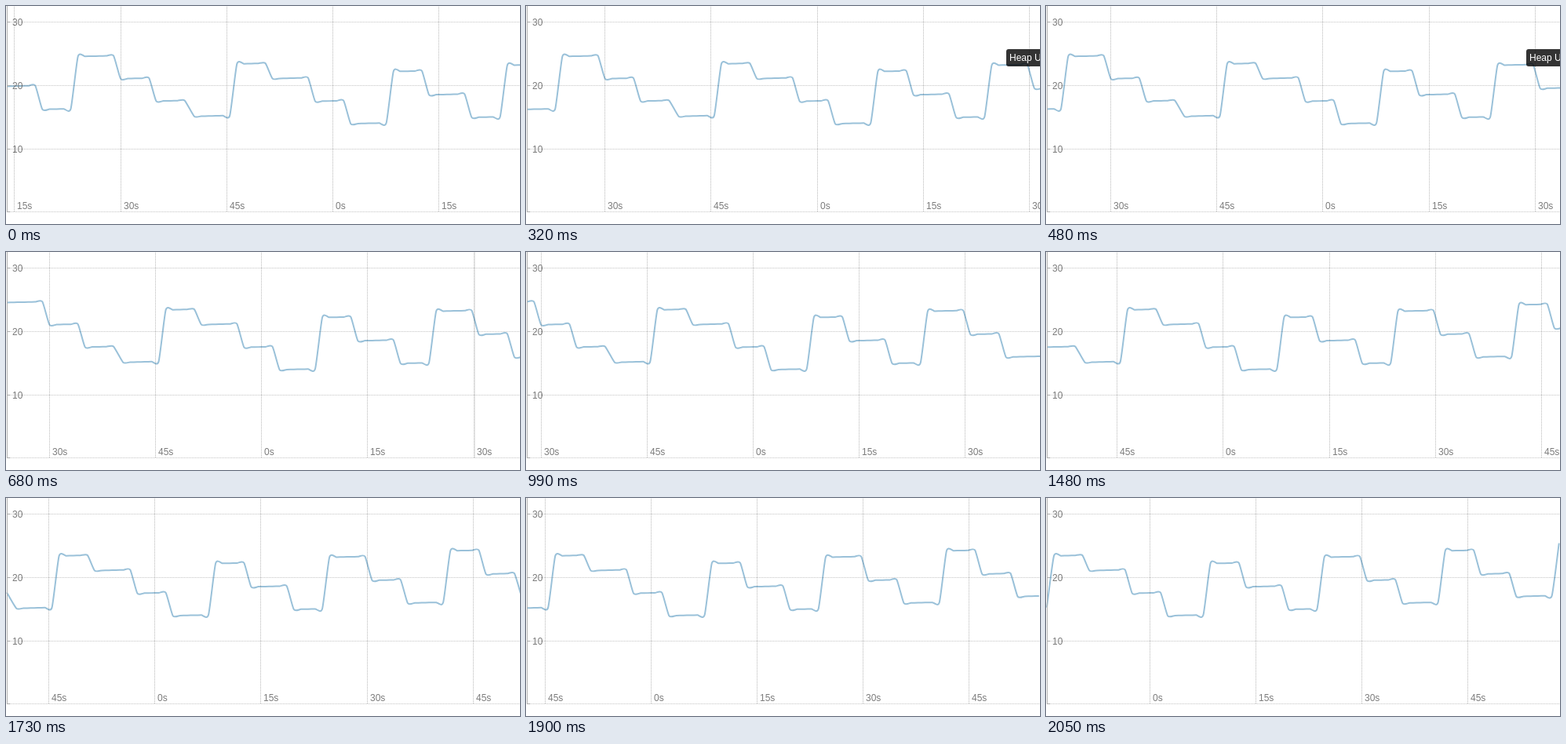
An HTML page with a canvas for the animation above (2.07 s loop, 655 px wide and 278 px high).

```html
<!DOCTYPE html>
<html lang="en">
<head>
<meta charset="utf-8">
<title>Scrolling heap chart</title>
<style>
html, body { margin: 0; width: 100%; height: 100%; overflow: hidden; background: #fff; }
canvas { display: block; }
</style>
</head>
<body>
<canvas id="chart" width="655" height="278"></canvas>
<script>
const ctx = document.getElementById('chart').getContext('2d');
const W = 655, H = 263, LOOP = 2070;
const SECOND = 9.012; // pixels per second of data
const WINDOW = 73;    // samples on screen
const GRAY = '#7c7c7c';

// Heap size at the start of each plateau
const levels = [
  19.85, 16.21, 24.55, 21.04, 17.51, 15.11, 23.38, 21.06, 17.48, 13.94,
  22.18, 18.5, 14.94, 23.16, 19.52, 15.94, 24.18, 20.52, 16.98, 25.4
];

const yOf = value => 262.8 - 8.08 * value;

// A plateau lasts about 5.46 samples and creeps upward; sample 26 came late
const plateauStart = n => Math.max(0, Math.floor(5.46 * n - 0.33));
const samples = Array.from({ length: 104 }, (_, i) => {
  const n = Math.ceil((i + 1.33) / 5.46) - 1;
  return {
    x: (1.006 * i - 46.09 + (i > 25 ? 0.35 : 0)) * SECOND,
    y: yOf(levels[n] + 0.027 * (i - plateauStart(n)))
  };
});

// One sample leaves on the left every 70 ms, a little faster near the end
function firstSample(t) {
  return Math.floor(0.5 + Math.min(t, 1280) / 70 + Math.max(0, t - 1280) / 63);
}

function line(x0, y0, x1, y1) {
  ctx.beginPath();
  ctx.moveTo(x0, y0);
  ctx.lineTo(x1, y1);
  ctx.stroke();
}

function text(label, x, y, color = GRAY) {
  ctx.fillStyle = color;
  ctx.fillText(label, x, y);
}

// Cardinal spline with tension 0.8 through the visible samples
function drawCurve(points, origin) {
  const handle = i => {
    const a = points[Math.max(0, i - 1)];
    const b = points[Math.min(points.length - 1, i + 1)];
    return [(b.x - a.x) * 0.1, (b.y - a.y) * 0.1];
  };
  ctx.save();
  ctx.translate(origin, 0);
  ctx.beginPath();
  ctx.moveTo(points[0].x, points[0].y);
  for (let i = 1; i < points.length; i++) {
    const p = points[i - 1], q = points[i];
    const [px, py] = handle(i - 1), [qx, qy] = handle(i);
    ctx.bezierCurveTo(p.x + px, p.y + py, q.x - qx, q.y - qy, q.x, q.y);
  }
  ctx.strokeStyle = '#9ac1d9';
  ctx.lineWidth = 2;
  ctx.stroke();
  ctx.restore();
}

function drawTimeGrid(origin) {
  ctx.strokeStyle = 'rgba(0,0,0,.28)';
  for (let n = -4; n <= 4; n++) {
    const x = Math.floor(origin + n * 15 * SECOND);
    if (x < 1) continue;
    line(x + 0.5, 1, x + 0.5, H);
    text((n * 15 + 60) % 60 + 's', x + 4, 259);
  }
}

function drawValueGrid() {
  ctx.strokeStyle = 'rgba(0,0,0,.23)';
  for (let value = 0; value <= 30; value += 10) {
    const y = Math.floor(yOf(value));
    line(1, y + 0.5, W, y + 0.5);
    ctx.fillStyle = '#b0b0b0';
    ctx.fillRect(1, y, 4, 1);
    if (value) text(value, 8, y + 5);
  }
  ctx.fillStyle = '#b0b0b0';
  ctx.fillRect(1, 0, 1, H);
}

function drawHover(t) {
  if (t >= 260 && t < 560) {
    ctx.fillStyle = 'rgba(0,0,0,.8)';
    ctx.beginPath();
    ctx.roundRect(612, 55, 110, 22, 3);
    ctx.fill();
    text('Heap Used: 23.3', 616, 70, '#fff');
  }
  if (t >= 665 && t < 735) {
    ctx.fillStyle = 'rgba(0,0,0,.1)';
    ctx.fillRect(597, 0, 1, H);
  }
}

function draw() {
  const t = performance.now() % LOOP;
  const first = firstSample(t);
  const origin = 1 - samples[first].x;
  ctx.clearRect(0, 0, W, 278);
  ctx.font = '12px "Liberation Sans", Arial, sans-serif';
  drawCurve(samples.slice(first, first + WINDOW), origin);
  ctx.lineWidth = 1;
  ctx.setLineDash([1, 1]);
  drawTimeGrid(origin);
  drawValueGrid();
  ctx.setLineDash([]);
  drawHover(t);
  requestAnimationFrame(draw);
}
draw();
</script>
</body>
</html>
```
